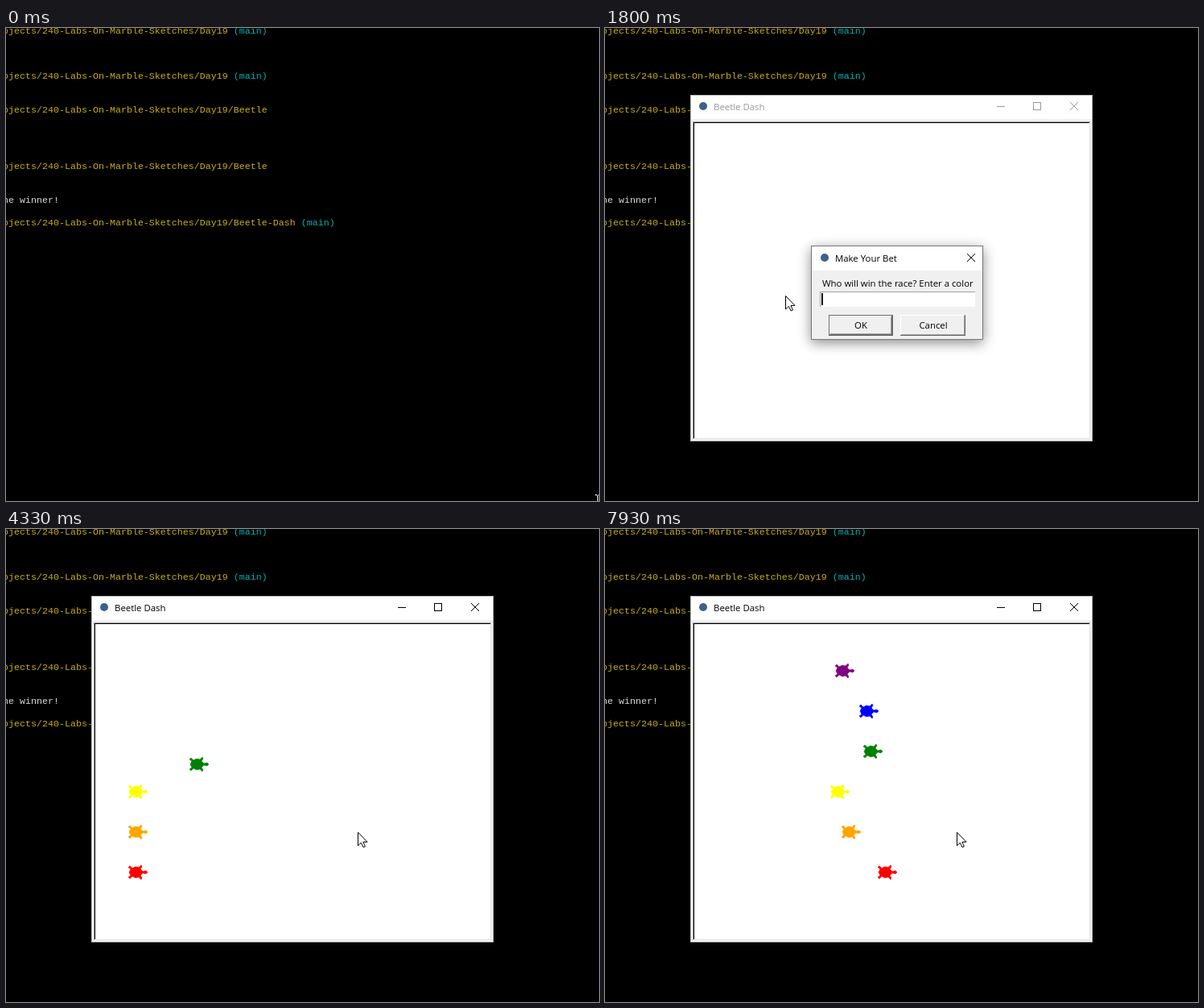
An HTML page for the animation above (8000 ms loop, 737 by 587 pixels).

```html
<!DOCTYPE html>
<html lang="en">
<head>
<meta charset="utf-8">
<title>Beetle Dash</title>
<style>
  html, body { margin: 0; width: 100%; height: 100%; overflow: hidden; background: #000; }
  svg { display: block; width: 737px; height: 587px; }
  text { white-space: pre; }
  #terminal { font: 11.667px "Liberation Mono", monospace; fill: #c9ad14; }
  #terminal .branch { fill: #00b2b2; }
  #terminal .output { fill: #d8d8d8; }
  .ui { font: 11.4px "Open Sans", sans-serif; }
  .ui text { fill: currentColor; }
  .line { fill: none; stroke: currentColor; }
  .crisp { shape-rendering: crispEdges; }
  .logo { fill: #3f5f8c; }
  .dark { stroke: #696969; }
  .mid { stroke: #a0a0a0; }
  #win { color: #999; }
  #win.active { color: #000; }
  #winFrame { filter: drop-shadow(0 2px 4px rgba(0, 0, 0, .35)); }
  #win.active #winFrame { filter: drop-shadow(0 4px 8px rgba(0, 0, 0, .45)); }
  #dlgFrame { fill: #f0f0f0; filter: drop-shadow(0 4px 8px rgba(0, 0, 0, .45)); }
  /* Until it has opened, the dialog is a flat sheet with see-through ink. */
  .opening #dlgFrame { fill: #fcfcfc; filter: none; }
  .opening #dlgBorder, .opening .mid { stroke: none; }
  .opening .dark { stroke: currentColor; }
  .opening .logo { fill: currentColor; }
  .turtle { stroke-width: .6; }
</style>
</head>
<body>
<svg viewBox="0 0 737 587">
  <g id="terminal"></g>

  <g id="win" class="ui">
    <rect id="winFrame" width="500" height="430" fill="#f0f0f0"/>
    <rect x=".5" y=".5" width="499" height="429" fill="none" stroke="#8a8a8a" stroke-opacity=".5"/>
    <rect x="1" y="1" width="498" height="29" fill="#fff"/>
    <circle class="logo" cx="16" cy="14" r="5"/>
    <text x="29" y="19">Beetle Dash</text>
    <path class="line crisp" d="M381 14.5h10M426.5 9.5h9v9h-9z"/>
    <path class="line" d="M472 9l10 10M482 9l-10 10"/>
    <g class="crisp" fill="none">
      <rect x="3" y="33" width="494" height="394" fill="#fff"/>
      <path d="M3.5 427V33.5H497" stroke="#a0a0a0"/>
      <path d="M4.5 426V34.5H496" stroke="#000"/>
      <path d="M496.5 34V426.5H4" stroke="#e3e3e3"/>
    </g>
    <g id="turtles"></g>
  </g>

  <g id="dlg" class="ui">
    <rect id="dlgFrame" width="214" height="117"/>
    <rect x="1" y="1" width="212" height="30" fill="#fff"/>
    <rect id="dlgBorder" class="crisp" x=".5" y=".5" width="213" height="116" fill="none" stroke="#777"/>
    <circle class="logo" cx="17" cy="15" r="5"/>
    <text x="30" y="20">Make Your Bet</text>
    <path class="line" d="M194 10l10 10M204 10l-10 10"/>
    <text x="14" y="51">Who will win the race? Enter a color</text>
    <g class="crisp" fill="none">
      <rect x="11" y="57" width="193" height="19" fill="#fff"/>
      <path class="mid" d="M11.5 76V57.5H204"/>
    </g>
    <text id="entry" x="13" y="71"></text>
    <rect id="caret" class="crisp" y="59" width="2" height="15" fill="currentColor"/>
    <g class="crisp" fill="none">
      <path class="dark" d="M22.5 111V86.5H101"/>
      <path d="M23.5 110V87.5H100" stroke="#fff"/>
      <path class="dark" d="M101.5 86V111.5H22M100.5 87V110.5H23"/>
      <path class="mid" d="M99.5 88V109.5H24M190.5 87V110.5H112"/>
      <path d="M111.5 111V86.5H191" stroke="#fff"/>
      <path class="dark" d="M191.5 86V111.5H111"/>
    </g>
    <text x="62" y="103" text-anchor="middle">OK</text>
    <text x="152" y="103" text-anchor="middle">Cancel</text>
  </g>

  <path id="beam" class="crisp" d="M-3 -7.5H0M1 -7.5H4M.5 -7V7M-3 7.5H0M1 7.5H4" fill="none" stroke="#fff"/>
  <path id="arrow" d="M.5 .5V17L4.3 13.4L7 19L9.4 18L6.9 12.4H12Z" fill="#fff" stroke="#000" stroke-linejoin="round"/>
</svg>

<script>
const LOOP = 8000, FRAME = 200 / 3;
const SVG = "http://www.w3.org/2000/svg";
const $ = id => document.getElementById(id);

function add(parent, tag, attrs, content = "") {
  const node = document.createElementNS(SVG, tag);
  for (const key in attrs) node.setAttribute(key, attrs[key]);
  node.textContent = content;
  parent.append(node);
  return node;
}

// Linear interpolation through rows of [time, ...values].
function track(rows, t) {
  if (t <= rows[0][0]) return rows[0].slice(1);
  const i = rows.findIndex(row => row[0] > t);
  if (i < 0) return rows[rows.length - 1].slice(1);
  const a = rows[i - 1], b = rows[i], k = (t - a[0]) / (b[0] - a[0]);
  return a.slice(1).map((v, n) => v + (b[n + 1] - v) * k);
}

// Terminal
const DAY = "ojects/240-Labs-On-Marble-Sketches/Day19";
const LINES = [
  [7, DAY, " (main)"],
  [63, DAY, " (main)"],
  [105, DAY + "/Beetle"],
  [175, DAY + "/Beetle"],
  [217, "he winner!", "", "output"],
  [245, DAY + "/Beetle-Dash", " (main)"]
];
for (const [y, path, branch = "", cls = ""] of LINES) {
  const line = add($("terminal"), "text", { x: -4, y, class: cls }, path);
  if (branch) add(line, "tspan", { class: "branch" }, branch);
}

// Racers: each glides from home to its lane, then all race
const WIN = { x: 106, y: 83 }, DLG = { x: 256, y: 270 };
const HOME = { x: 400, y: 326 }, GATE = 160;
const RACE_TIMES = [5130, 5600, 5870, 6730, 7930];
const HALF = [[16, 0], [14, 2], [10, 1], [7, 4], [9, 7], [8, 9], [5, 6], [1, 7], [-3, 5], [-6, 8], [-8, 6], [-5, 4], [-7, 0]];
const OUTLINE = [...HALF, ...HALF.slice(1, -1).reverse().map(([x, y]) => [x, -y])].join(" ");

const racers = [
  ["red", 3190, 3490, [33, 49, 109, 187]],
  ["orange", 3520, 3803, [36, 51, 94, 142]],
  ["yellow", 3830, 4107, [26, 33, 69, 128]],
  ["green", 4137, 4420, [20, 32, 94, 169]],
  ["blue", 4480, 4780, [30, 45, 99, 164]],
  ["purple", 4805, 5130, [22, 29, 73, 134]]
].map(([color, start, end, gains], lane) => {
  const y = 426 - 50 * lane;
  return {
    start,
    node: add($("turtles"), "polygon", { class: "turtle", points: OUTLINE, fill: color, stroke: color }),
    rows: [
      [start, HOME.x, HOME.y],
      [end, GATE, y],
      ...RACE_TIMES.map((time, i) => [time, GATE + (i ? gains[i - 1] : 0), y])
    ]
  };
});

// Motion tables
const OPEN = [[1470, .02, .95], [1530, .15, .956], [1600, .46, .972], [1670, .77, .988], [1730, .94, .996], [1800, 1, 1]];
const CLOSE = [[3000, 1, 1], [3070, .8, .985], [3130, .4, .965], [3200, 0, .95]];
const BEAM = [[0, 735, 587], [70, 690, 562], [130, 560, 500], [200, 395, 410], [270, 265, 348], [330, 226, 333]];
const ARROW = [
  [2070, 224, 332], [2130, 240, 331], [2200, 272, 338], [2270, 300, 350], [2330, 311, 355],
  [2470, 311, 355], [2600, 317, 359], [3270, 317, 359],
  [3470, 420, 300], [3600, 446, 292], [3770, 446, 345], [3930, 437, 376]
];
const TYPED = [[2930, "red"], [2730, "re"], [2600, "r"], [0, ""]];
const CARET_X = { "": 13, r: 17, re: 22, red: 29 };

const place = (node, x, y, scale = 1) =>
  node.setAttribute("transform", `translate(${x} ${y}) scale(${scale})`);
const show = (node, on) => { node.style.display = on ? "" : "none"; };

function render(t) {
  const opened = t >= 1470, opening = t < 1800, closing = t >= 3000;
  const [alpha, scale] = track(OPEN, t);
  const shrink = (1 - scale) / .044;

  show($("win"), opened);
  $("win").style.opacity = alpha;
  $("win").classList.toggle("active", t >= 3070);
  place($("win"), WIN.x + 2 * shrink, WIN.y + shrink, scale);

  const [fade, size] = closing ? track(CLOSE, t) : [alpha, 1 - (1 - scale) * 1.1];
  const ink = opening ? Math.round(255 * alpha) : 0;
  show($("dlg"), opened && fade > 0);
  $("dlg").classList.toggle("opening", opening);
  $("dlg").style.opacity = fade;
  $("dlg").style.color = `rgb(${ink}, ${ink}, ${ink})`;
  if (closing) place($("dlg"), DLG.x + 107 * (1 - size), DLG.y + 58 * (1 - size), size);
  else place($("dlg"), DLG.x + 4 * shrink, DLG.y + 2 * shrink, size);

  const typed = TYPED.find(([time]) => t >= time)[1];
  $("entry").textContent = typed;
  $("caret").setAttribute("x", CARET_X[typed]);

  for (const { node, start, rows } of racers) {
    show(node, t >= start);
    const [x, y] = track(rows, t);
    place(node, Math.round(x) - WIN.x, Math.round(y) - WIN.y);
  }

  show($("beam"), t < 1000);
  place($("beam"), ...track(BEAM, t).map(Math.round));
  show($("arrow"), opened);
  place($("arrow"), ...track(ARROW, t).map(Math.round));
}

// Frames fall on fifteenths of a second, rounded to 10 ms.
const began = performance.now();
function tick() {
  const t = (performance.now() - began) % LOOP;
  const frame = Math.floor((t + 4) / FRAME);
  render(Math.round(frame * FRAME / 10) * 10 % LOOP);
  requestAnimationFrame(tick);
}
tick();
</script>
</body>
</html>
```
